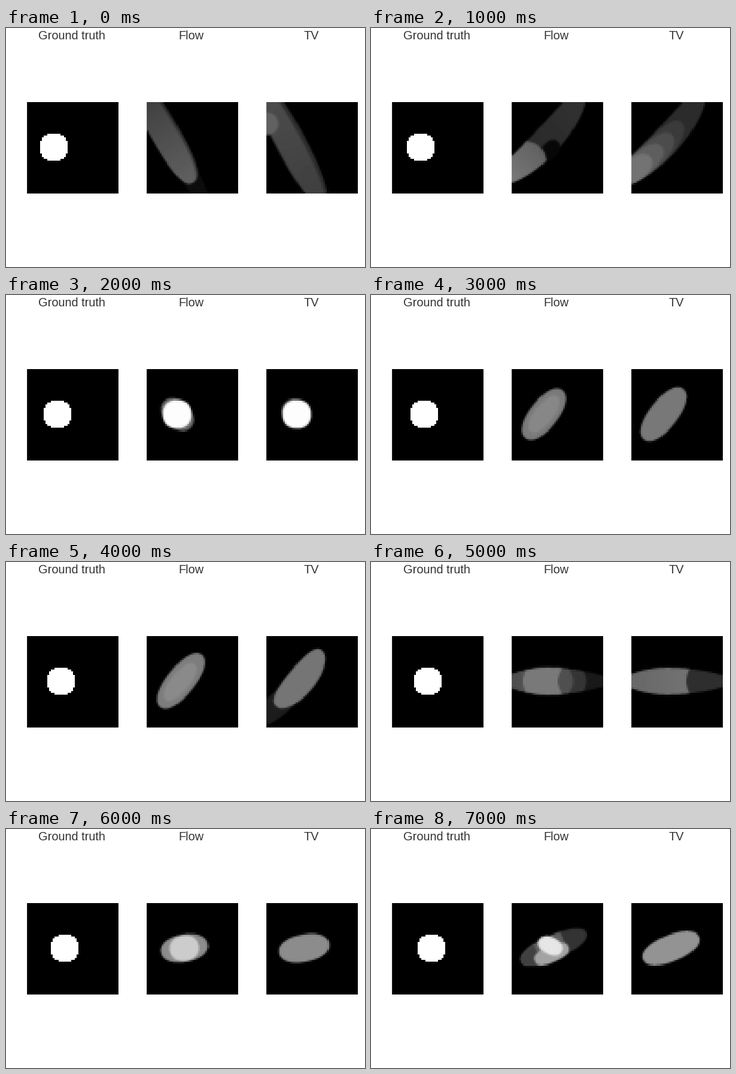
Recreate the animation shown at these times as a matplotlib script. Size 600x400 px, loop 8000 ms.

```python
import numpy as np
import matplotlib.pyplot as plt
from matplotlib.animation import FuncAnimation

W, H, DPI = 600, 400, 100
CELLS, SIDE, SUB = 50, 153, 4
TOP, LEFTS = 124, (35, 235, 435)
STEPS, STEP_MS = 8, 1000
CENTER_X, CENTER_Y = 14.5, 24.5  # disc centre at step 0, in cells
SOFT, EDGE = 0.25, 0.15
FAR = 99

axis = (np.arange(CELLS * SUB) + 0.5) / SUB
GX, GY = np.meshgrid(axis, axis)


def shrink(fine):
    return fine.reshape(CELLS, SUB, CELLS, SUB).mean(axis=(1, 3))


def soften(img):
    p = np.pad(img, 1, mode="edge")
    near = (p[:-2, 1:-1] + p[2:, 1:-1] + p[1:-1, :-2] + p[1:-1, 2:]) / 4
    return img * (1 - SOFT) + near * SOFT


def disc(k):
    y, x = np.mgrid[:CELLS, :CELLS] + 0.5
    return ((x - CENTER_X - k) ** 2 + (y - CENTER_Y) ** 2 < 64).astype(float)


class Smear:
    """The disc smeared along one direction, built up layer by layer."""

    def __init__(self, k, angle, bend=0):
        self.dx, self.dy = GX - CENTER_X - k, GY - CENTER_Y
        self.angle, self.bend = angle, bend
        self.img = np.zeros((CELLS, CELLS))

    def add(self, start, end, v0, v1=None, half=7.7, power=2.2, mid=None,
            side=0, cut=(-FAR, FAR), curve=0, turn=0):
        """Oval from start to end along the axis, shaded from v0 to v1.

        mid is the widest place, side a sideways shift, and cut keeps
        a part of the axis whose borders curve with the distance to it.
        """
        a = np.radians(self.angle + turn)
        s = self.dx * np.cos(a) + self.dy * np.sin(a)
        d = self.dy * np.cos(a) - self.dx * np.sin(a) - self.bend * s ** 2 - side
        mid = (start + end) / 2 if mid is None else mid
        reach = np.where(s < mid, mid - start, end - mid)
        oval = np.abs((s - mid) / reach) ** power + np.abs(d / half) ** power < 1
        border = s - curve * d ** 2
        mask = soften(shrink(oval & (border > cut[0]) & (border < cut[1])))
        t = np.clip((s - start) / (end - start), 0, 1)
        shade = shrink(v0 + ((v0 if v1 is None else v1) - v0) * t)
        self.img += (shade - self.img) * mask
        return self


def flow_frames():
    yield (Smear(0, 60)
           .add(-42, 38, 0.05, half=6)
           .add(-42, 22, 0.14, 0.25, power=2.6)
           .add(-42, 22, 0.22, 0.38, half=7, power=2.6, side=0.8))
    yield (Smear(1, -45, bend=-0.0033)
           .add(-31, 39, 0.14, 0.2)
           .add(-4, 9, 0.03, half=4.5, side=5)
           .add(-31, 39, 0.5, 0.22, cut=(-FAR, 0), curve=-0.05))
    yield (Smear(2, 45)
           .add(-10, 10.5, 0.4, half=7)
           .add(-7.8, 7.8, 0.99, half=7.8, power=2.3, turn=-45))
    yield (Smear(3, -52)
           .add(-16.5, 16.5, 0.48)
           .add(-12, 12, 0.53, half=5))
    yield (Smear(4, -51)
           .add(-18, 18.5, 0.49, half=7.6)
           .add(-13, 12, 0.54, half=5))
    spindle = dict(half=7.4, power=1.6, mid=0)
    smear = Smear(5, 0)
    for end, v in ((FAR, 0.1), (21, 0.21), (14, 0.31)):
        smear.add(-25, 36, v, cut=(-FAR, end), curve=-0.05, **spindle)
    yield (smear
           .add(-25, 36, 0.28, 0.5, cut=(-FAR, 5.5), curve=0.05, **spindle)
           .add(-25, 36, 0.48, cut=(-13.5, 5.5), curve=0.05, **spindle))
    yield (Smear(6, -10)
           .add(-13, 13, 0.55, half=7.5)
           .add(-8, 8, 0.8, half=7))
    yield (Smear(7, -24)
           .add(-18, 21, 0.2, half=6.5)
           .add(-18, 21, 0.37, half=6.5, cut=(-FAR, 8))
           .add(-18, 21, 0.25, half=6.5, cut=(-FAR, -8))
           .add(-11, 9, 0.64, half=4.5, side=3, power=2.6)
           .add(-8, 6, 0.9, half=4.7, side=-1, turn=50))


def tv_frames():
    yield (Smear(0, 62)
           .add(-42, 37, 0.18, half=8.2)
           .add(-42, 37, 0.31, 0.24, half=6.7, side=0.8)
           .add(-24, -12, 0.38, half=6, side=6.5))
    smear = Smear(1, -45, bend=-0.0033).add(-31, 39, 0.17)
    for n, v in enumerate((0.23, 0.3, 0.37, 0.45)):
        smear.add(-31, 18 - 8.5 * n, v, half=7.4 - 0.4 * n, mid=-3 - 5 * n)
    yield smear
    yield (Smear(2, 45)
           .add(-9, 8, 0.3, half=7)
           .add(-7.8, 7.8, 0.99, half=7.8, power=2.3, turn=-45))
    yield Smear(3, -52).add(-17.5, 17.5, 0.47)
    yield (Smear(4, -50, bend=-0.004)
           .add(-36, 0, 0.11, half=6.5)
           .add(-19, 20.5, 0.46, half=7.5))
    spindle = dict(half=7.4, power=1.7, mid=0)
    yield (Smear(5, 0)
           .add(-25, 36, 0.18, **spindle)
           .add(-25, 36, 0.4, 0.48, cut=(-FAR, 10.5), curve=0.04, **spindle))
    yield Smear(6, -11).add(-14, 14, 0.55, half=7.5)
    yield Smear(7, -22).add(-16.5, 16.5, 0.58, half=7.2)


flow = [smear.img for smear in flow_frames()]
tv = [smear.img for smear in tv_frames()]

# Nearest-neighbour map from panel pixels to cells
nearest = np.arange(SIDE) * CELLS // SIDE


def stage(k):
    canvas = np.ones((H, W))
    for left, cells in zip(LEFTS, (disc(k), flow[k], tv[k])):
        panel = cells[np.ix_(nearest, nearest)]
        panel[:, 0] += EDGE * (1 - panel[:, 0])  # partly covered column
        canvas[TOP:TOP + SIDE, left:left + SIDE] = panel
    return canvas


fig = plt.figure(figsize=(W / DPI, H / DPI), dpi=DPI, facecolor="white")
ax = fig.add_axes([0, 0, 1, 1])
ax.axis("off")
view = ax.imshow(stage(0), cmap="gray", vmin=0, vmax=1,
                 interpolation="nearest", aspect="auto")

for x, title in zip((109.5, 309, 510), ("Ground truth", "Flow", "TV")):
    fig.text(x / W, 1 - 19 / H, title, ha="center", va="baseline",
             family="Liberation Sans", size=20 * 72 / DPI, color="#333333")


def update(k):
    view.set_data(stage(k))
    return [view]


anim = FuncAnimation(fig, update, frames=STEPS, interval=STEP_MS,
                     repeat=True, repeat_delay=0)
plt.show()
```
